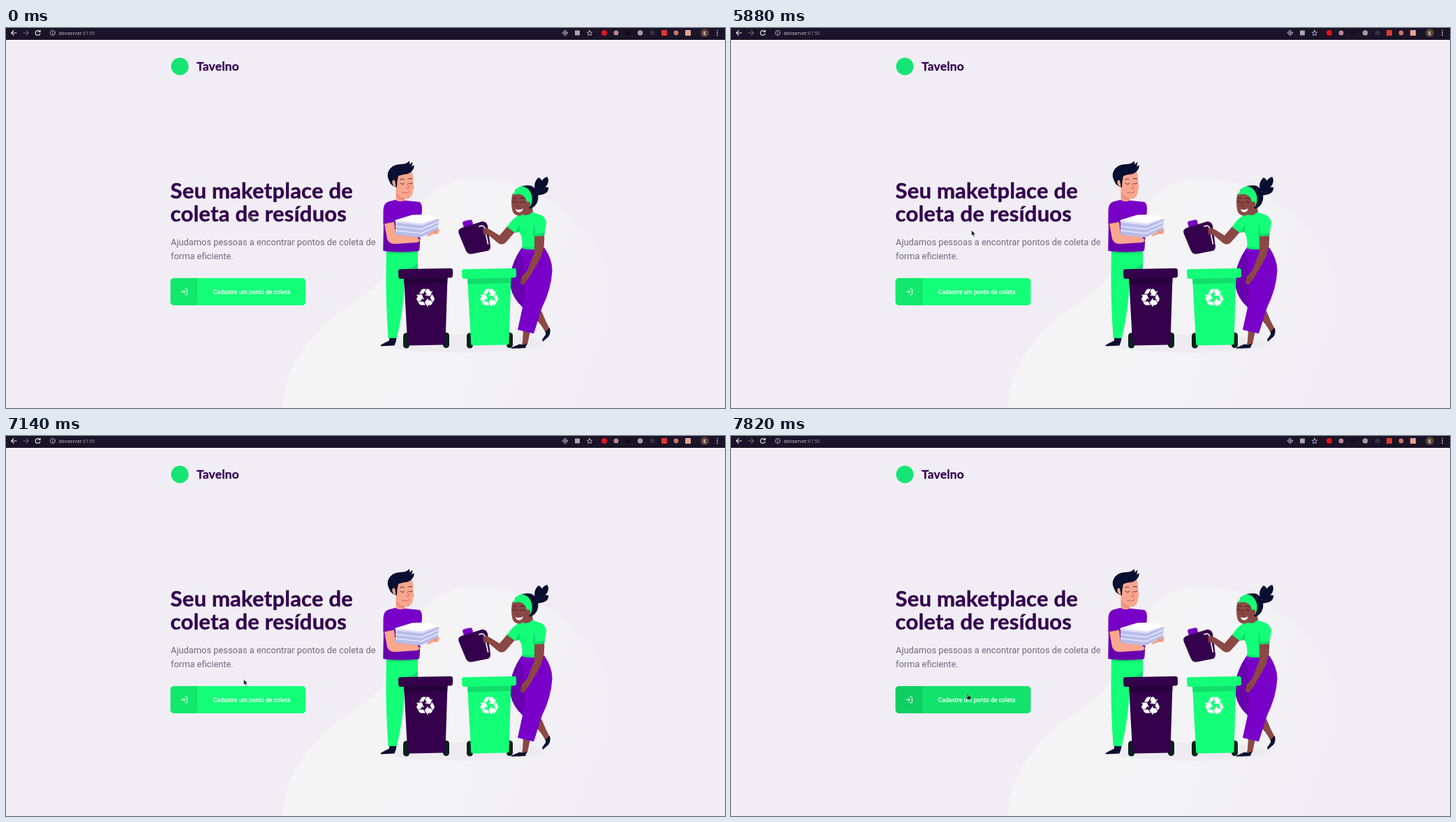
These frames come from a looping animation (1030x544 px, 8000 ms). An HTML page:

```html
<!DOCTYPE html>
<html lang="pt">
<head>
<meta charset="utf-8">
<title>Coleta de resíduos</title>
<style>
html, body { margin: 0; width: 100%; height: 100%; overflow: hidden; background: #f0eef4; }
svg { display: block; width: 1030px; height: 544px; }
.head { font: 700 31px Lato, "Noto Sans", sans-serif; letter-spacing: .22px; fill: #34004f; stroke: #34004f; stroke-width: .45; }
.name { font-size: 17.4px; stroke-width: .3; }
.lead { font: 400 12.87px Roboto, Arial, sans-serif; fill: #6f6a80; }
.label { font: 500 8.58px Roboto, Arial, sans-serif; fill: #fff; text-anchor: middle; }
.url { font: 400 7.6px Roboto, Arial, sans-serif; fill: #b5b1bc; }
.line { fill: none; stroke-linecap: round; stroke-linejoin: round; }
.navy { fill: #080f30; }
.green { fill: #14ff78; }
.greenDark { fill: #11df6b; }
.violet { fill: #7900c8; }
.shade { fill: #6800ae; }
.plum { fill: #34004b; }
.skin { fill: #f9a68e; }
.brown { fill: #8b4845; }

/* Cursor and button share one stepped 8 s clock */
#cursor { animation: move 8s step-end infinite; }
#arrow { animation: arrow 8s step-end infinite; }
#beam { animation: beam 8s step-end infinite; }
#hand { animation: hand 8s step-end infinite; }
#button { animation: hover 8s step-end infinite; }
@keyframes move {
  0% { transform: translate(349px, 268px); }
  1.75% { transform: translate(350.5px, 264px); }
  66.5% { transform: translate(350px, 267px); }
  70.25% { transform: translate(349.5px, 270px); }
  71.75% { transform: translate(346px, 281px); }
  73.5% { transform: translate(344px, 289px); }
  77.25% { transform: translate(347.5px, 297px); }
  80.25% { transform: translate(345px, 293px); }
  82.25% { transform: translate(340px, 330px); }
  85.5% { transform: translate(340px, 340px); }
  89.25% { transform: translate(340px, 348px); }
  92.75% { transform: translate(339.6px, 355px); }
  96% { transform: translate(337px, 355px); }
  97.75%, 100% { transform: translate(336px, 369px); }
}
@keyframes arrow {
  0% { opacity: 1; }
  1.75% { opacity: 0; }
  71.75% { opacity: 1; }
  77.25% { opacity: 0; }
  82.25% { opacity: 1; }
  96%, 100% { opacity: 0; }
}
@keyframes beam {
  0% { opacity: 0; }
  1.75% { opacity: 1; }
  71.75% { opacity: 0; }
  77.25% { opacity: 1; }
  82.25%, 100% { opacity: 0; }
}
@keyframes hand {
  0% { opacity: 0; }
  96%, 100% { opacity: 1; }
}
@keyframes hover {
  0% { fill: #14ff78; }
  96%, 100% { fill: #12e36c; }
}
</style>
</head>
<body>
<svg viewBox="0 0 1030 544">
  <defs>
    <linearGradient id="glow" gradientUnits="userSpaceOnUse" x1="470" y1="340" x2="850" y2="480">
      <stop offset="0" stop-color="#f6f5f5"/>
      <stop offset=".5" stop-color="#f4f3f5"/>
      <stop offset="1" stop-color="#f0eef4"/>
    </linearGradient>
    <path id="arm" d="M-8.8-5.7-5.8-10.8Q-5-12.2-3.4-12.2H.4L-3.4-5.8ZM1.7-12.2H3.4Q5-12.2 5.8-10.8L7.3-8.2 9.7-9.4 6.6-2.4-.8-3.4 1.7-4.8-.4-8.6Z"/>
    <g id="recycle" fill="#fff" stroke="#fff" stroke-width=".4">
      <use href="#arm"/>
      <use href="#arm" transform="rotate(120)"/>
      <use href="#arm" transform="rotate(240)"/>
    </g>
    <!-- Bin parts, origin at the left edge of the lid -->
    <rect id="wheel" width="9" height="22" rx="4.2" fill="#07231b"/>
    <path id="tub" d="M8 13 70.5 12 67.5 107Q67.3 109.5 65 109.6L16 110.5Q13.5 110.5 13.2 108Z"/>
    <path id="rim" d="M8 14 70.5 13 70.2 21 8.6 23Z"/>
    <path id="lid" d="M3 1.2 74.7 0Q77.8 0 78 3V10.5Q77.8 13.4 75 13.6L3.5 15Q.5 15 .3 12.2L0 4.3Q0 1.3 3 1.2Z"/>
  </defs>

  <path fill="url(#glow)" d="M397 544C396 494 430 440 486 402C530 373 548 357 566 310C584 260 613 215 671 215C724 215 773 238 814 276C856 316 870 362 868 420C867 470 862 510 850 544Z"/>

  <!-- Browser bar -->
  <rect width="1030" height="17" fill="#1b1428"/>
  <rect y="17" width="1030" height="1" fill="#fff"/>
  <g class="line" stroke="#e6e3ea" stroke-width="1.2">
    <path d="M15 7H8M11 3.7 7.7 7 11 10.3"/>
    <path stroke="#69636f" d="M25 7H32M29 3.7 32.3 7 29 10.3"/>
    <path d="M48.3 5A3.4 3.4 0 1 0 48.9 8M49 3V5.5H46.4"/>
    <g stroke="#bcb8c2" stroke-width=".9">
      <circle cx="67" cy="7" r="3.5"/>
      <path d="M67 6.7V8.8M67 5.1V5.2"/>
      <circle cx="801" cy="7" r="2.9"/>
      <path d="M801 3V4.3M801 9.7V11M797 7H798.3M803.7 7H805"/>
      <path d="M836 3.2 837 6 839.8 6.1 837.6 7.9 838.4 10.6 836 9.1 833.6 10.6 834.4 7.9 832.2 6.1 835 6Z"/>
    </g>
  </g>
  <circle cx="801" cy="7" r="1.3" fill="#bcb8c2"/>
  <text class="url" x="75.5" y="9.8">devserver<tspan fill="#85808c">:8150</tspan></text>
  <rect x="815" y="3.5" width="7" height="7" fill="#a9a6ae"/>
  <circle cx="857" cy="7" r="3.9" fill="#e0151c"/>
  <circle cx="874" cy="7" r="3.5" fill="#b9878f"/>
  <circle cx="891" cy="7" r="3.5" fill="#120d1b"/>
  <circle cx="908.5" cy="7" r="3.8" fill="#9ba39b"/>
  <circle cx="926" cy="7" r="3.6" fill="#35303d"/>
  <rect x="939" y="3" width="8" height="8" fill="#db3a2f"/>
  <circle cx="960" cy="7" r="3.4" fill="#c97768"/>
  <rect x="973" y="3" width="8" height="8" fill="#e5a197"/>
  <circle cx="1001" cy="7" r="6" fill="#5a4038"/>
  <text x="1001" y="9.6" class="label" style="font-size:7px">E</text>
  <g fill="#d8d5dc">
    <circle cx="1019" cy="3.8" r=".9"/><circle cx="1019" cy="7" r=".9"/><circle cx="1019" cy="10.2" r=".9"/>
  </g>

  <!-- Page text -->
  <circle cx="249" cy="55" r="12.5" fill="#16e575"/>
  <text class="head name" x="273" y="61">Tavelno</text>
  <text class="head" x="235.5" y="244">Seu maketplace de</text>
  <text class="head" x="235.5" y="277">coleta de resíduos</text>
  <text class="lead" x="236" y="310.5">Ajudamos pessoas a encontrar pontos de coleta de</text>
  <text class="lead" x="236" y="331">forma eficiente.</text>

  <rect id="button" class="green" x="235.6" y="358" width="193.8" height="39" rx="4.8"/>
  <path fill="#000" fill-opacity=".09" d="M240.4 358H274.4V397H240.4Q235.6 397 235.6 392.2V362.8Q235.6 358 240.4 358Z"/>
  <path class="line" stroke="#fff" stroke-width=".95" d="M256.6 373.2H258.3Q259.4 373.2 259.4 374.3V380.7Q259.4 381.8 258.3 381.8H256.6M254.3 379.8 256.6 377.5 254.3 375.2M256.4 377.5H251"/>
  <text class="label" x="352" y="380.6">Cadastre um ponto de coleta</text>

  <ellipse cx="656" cy="452" rx="117" ry="12.5" fill="#edebf0"/>

  <!-- Man: legs -->
  <path class="navy" d="M549 442H560L558.5 449 556.5 454.5 537 455.5Q535.5 454 540 452L549 447.5Z"/>
  <path class="green" d="M545 317H590V345L571 362Q570 400 560 444H547.5Q543 380 545 317Z"/>
  <path class="greenDark" d="M574 345Q588 340 590 336V345Z"/>
  <path class="greenDark" d="M545 319H590V322Q560 325 545 322Z"/>

  <!-- Left bin -->
  <use href="#wheel" x="569" y="436.5"/>
  <use href="#wheel" x="626" y="436"/>
  <g transform="translate(562 344)">
    <use href="#tub" class="plum"/>
    <use href="#rim" fill="#260039"/>
    <use href="#lid" class="plum"/>
    <use href="#recycle" x="39" y="42"/>
  </g>

  <!-- Man: head -->
  <path class="skin" d="M560 207 582 206Q584 215 583.5 222L584.8 229 583 231Q583.5 240 577 244Q573 245.5 571 243.5L572 252H558.5V229Q552 224 555 217Z"/>
  <path fill="#ec8e79" d="M559 234Q563 243 571 243.5L571.5 248Q562 246 559 240Z"/>
  <path class="navy" d="M560 228Q552 227 549 219Q545 211 548 205Q553 195 565 195Q574 195 577.5 190.5Q579 192 578 195Q581 194 582 191.5Q583 195 580.5 198L585 196.5Q584 206 575 209Q566 210 562 212Q560 219 560 228Z"/>
  <path class="skin" d="M557 218Q552.5 217 553.5 222Q554.5 227 558.5 227Z"/>
  <g class="line" stroke="#3b2434" stroke-width=".9">
    <path d="M564.5 217Q567 215 570 216.5M576 216Q578.5 214.5 581.5 216"/>
    <path d="M565 222.5Q567.5 225 570.5 222.8M577 222.5Q579.5 224.5 582 222"/>
    <path stroke="#c85f5c" d="M567 235Q572 238 577.5 234.5M575 223 577 229 574 230"/>
  </g>

  <!-- Man: body, arms and papers -->
  <path class="violet" d="M558 246Q563 250 572 247L592 249Q596 251 596 259L592 319Q565 322 540.5 319L541 259Q541 251 548 248.5Z"/>
  <path class="shade" d="M541 290 557 277 594 290 592 319Q565 322 540.5 319Z"/>
  <path class="skin" d="M541.5 277 556 276 558 296 588 298 593 304 590 307 559 309Q549 310 546 302Z"/>
  <path class="skin" d="M605 286 617 285 621 289 619 295 613 295 603 299Z"/>
  <path class="violet" d="M546 250Q540 253 540.5 264V280L557 277 560 261Z"/>
  <path class="line" stroke="#5b0098" stroke-width=".8" d="M541 280 556.5 277.2 559 266"/>
  <path fill="#b8bdea" d="M558 278 596 282 620 273 619 288 594 300 558 296Z"/>
  <path class="line" stroke="#e4e6fa" stroke-width="1.7" d="M558.5 284 595 288 619.5 277.5M558 290 594.5 294 618.5 283.5"/>
  <path fill="#fff" d="M557.5 275 582 267.5 604 267 620 271.5 596 282 558 278Z"/>
  <path fill="#dfe1f7" d="M557.5 275 558 278.5 596 282.5 620 271.5 596 279.8Z"/>
  <path class="line" stroke="#d77f70" stroke-width=".7" d="M612 291 619 290M612 293.2 618.5 293"/>

  <!-- Woman: legs -->
  <path class="brown" d="M759 411 767 405 773 419 779 431 773 437Q770 429 762 420Z"/>
  <path class="navy" d="M779 429Q781 437 777 442L769 449 768 446 773 439 773.5 434Z"/>
  <path class="brown" d="M741 432 751 434 747 453 738 456 740 449Z"/>
  <path class="navy" d="M724 457.5 736 452.5Q741 455 746.5 451.5L744 458Q734 459 724 458.8Z"/>
  <path class="violet" d="M739 314H771Q783 332 782.5 348Q781 374 768 400L756 437.5 733 432 740 400Q726 387 723 371V350Q727 332 739 314Z"/>
  <path class="shade" d="M736 319Q727 333 723 350V371Q726 387 740 398Q744 384 742 368Q743 342 736 319Z"/>

  <!-- Right bin -->
  <use href="#wheel" x="660" y="436.5"/>
  <use href="#wheel" x="717" y="436"/>
  <g transform="translate(653 344)">
    <use href="#tub" class="green"/>
    <use href="#rim" class="greenDark"/>
    <use href="#lid" class="green"/>
    <use href="#recycle" x="39.5" y="42"/>
  </g>

  <!-- Jug -->
  <path class="violet" d="M654 279Q654 277 656 276.5L665 274.5Q667.5 274 668 276.5L669 281 664 284 656 286Z"/>
  <path class="plum" d="M653 286 682 277Q688 276.5 690 283L694 313Q694 318 690 319L667 323.5Q661 324 658.5 318L648.5 294Q646.5 288.500 653 286Z"/>
  <path class="line" stroke="#f5f3f6" stroke-width="1.7" d="M678 284Q684 281.5 685.5 286L690.5 309"/>

  <!-- Woman: reaching arm, torso, other arm -->
  <path class="brown" d="M719 283 730 291 716 307Q711 312 705 308L692 297 684 295 683 288 688 286 694 289 707 297Z"/>
  <path class="line" stroke="#642f33" stroke-width=".7" d="M684 290 689 291M684.5 293 690 294"/>
  <path class="brown" d="M744 252 753 250 756 270 740 271Z"/>
  <path class="green" d="M738 266Q746 271 754 263.5L767 268Q774 272 774 280L771 297 770 315Q753 319 739 315.5Q741 301 735 291L729 293 718 285Q724 273 738 266Z"/>
  <path class="greenDark" d="M729 293 736 281 737 292ZM755 297 757 276 759 298ZM739 313Q754 316 770 312.5V315Q753 319 739 315.5Z"/>
  <path class="brown" d="M757 296H771Q773 320 759 341L749 358 741 368 737 365 739 356 747 347 757 321Z"/>
  <path class="line" stroke="#642f33" stroke-width=".7" d="M740 363 744 357M742.5 366 746.5 359"/>
  <path class="greenDark" d="M755 294.5 772 293 771 297.5 755 298.5Z"/>

  <!-- Woman: head -->
  <g class="navy">
    <path d="M729 232Q740 223 753 226Q762 231 762.5 243Q761 256 750 259L744 245Z"/>
    <path d="M758 233Q755 220 763 214Q770 217 768 228L762 235Z"/>
    <path d="M763 233Q765 216 775 213Q779 217 775 225L765 236Z"/>
    <path d="M761 235Q768 226 777 228Q778 235 770 238L761 240Z"/>
  </g>
  <path class="brown" d="M726 237 742 235 751 246Q753 254 747 259Q742 270 733 268.5Q725 267 724.5 256Q723 244 726 237Z"/>
  <path class="green" d="M727 239Q729 230 735 227.5Q747 224 753 239Q755 248 751 256L746 248Q742 234 727 239Z"/>
  <path class="brown" d="M746 249Q752 247 751 254Q749 259 745 257Z"/>
  <path fill="#fff" d="M730 259.5Q736 261.5 741 258.5Q739 264.5 734 263.5Q731 263 730 259.5Z"/>
  <g class="line" stroke="#35151f" stroke-width=".9">
    <path d="M726.5 244Q728.5 242.5 731 244M737 243.5Q740 242 743 244.5"/>
    <path d="M726 249Q728.5 247 730.5 249.5M737 249.5Q740 247.5 742.5 250"/>
    <path stroke="#642f33" d="M733 249 731 255 734 256"/>
  </g>

  <g id="cursor">
    <g id="arrow">
      <path d="M.6.5V8.3L2.4 6.7 3.7 9.7 5 9.1 3.7 6.2H6.2Z" fill="#15121a" stroke="#fff" stroke-opacity=".75" stroke-width=".6"/>
    </g>
    <g id="beam" class="line">
      <path id="stem" d="M-1.7.8Q0 .8 0 2V8Q0 9.2-1.7 9.2M1.7.8Q0 .8 0 2M0 8Q0 9.2 1.7 9.2" stroke="#fff" stroke-opacity=".6" stroke-width="1.5"/>
      <path d="M-1.7.8Q0 .8 0 2V8Q0 9.2-1.7 9.2M1.7.8Q0 .8 0 2M0 8Q0 9.2 1.7 9.2" stroke="#1b1722" stroke-width=".8"/>
    </g>
    <g id="hand">
      <path d="M2.5 1Q3.3.2 4 1.2L4.5 3.4 7 3.7Q8 4 7.9 5.2L7.3 8.3H3.4L1 5.6Q1.4 4.5 2.9 5.1Z" fill="#1b1620" stroke="#fff" stroke-opacity=".65" stroke-width=".5"/>
    </g>
  </g>
</svg>
</body>
</html>
```
